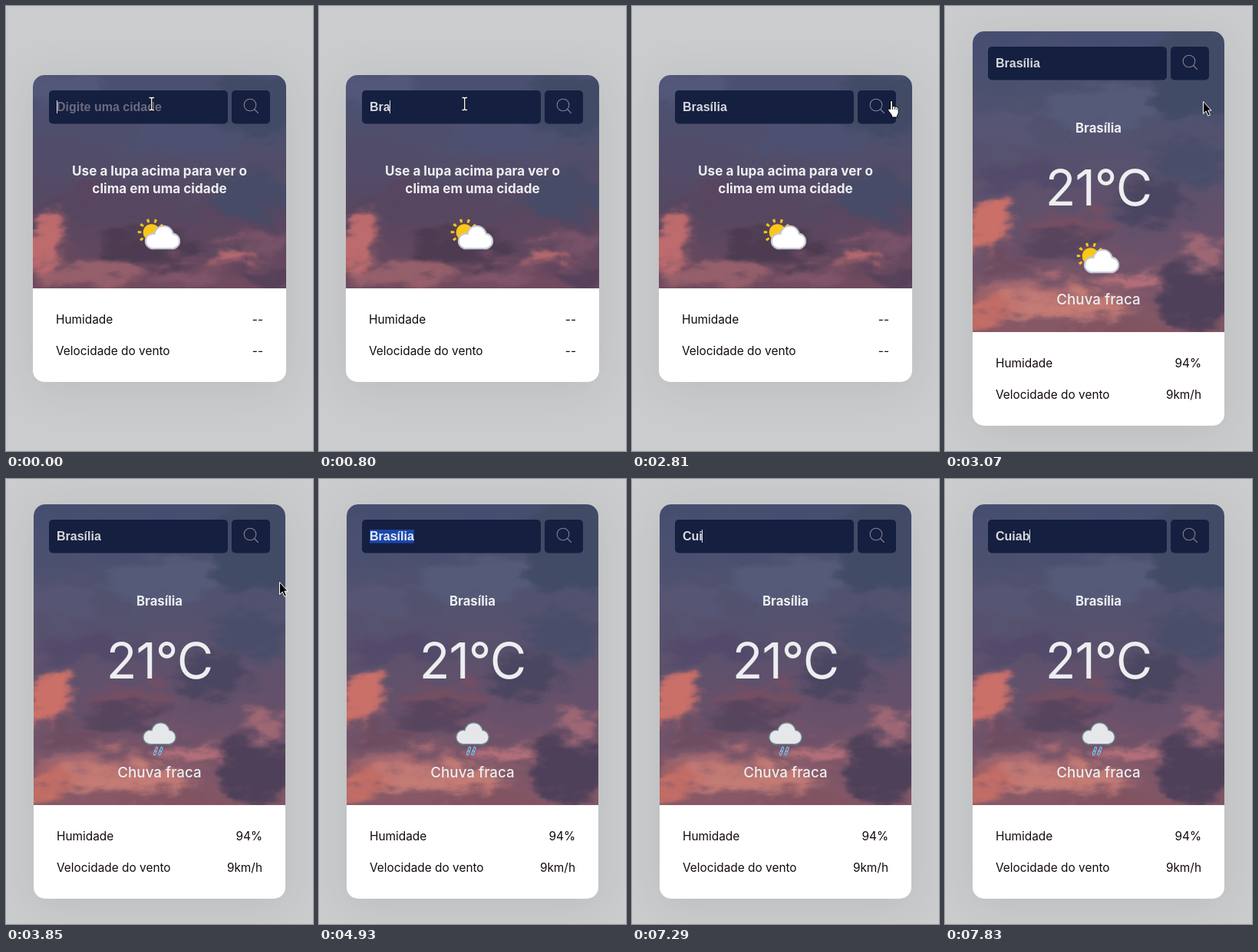
An HTML page that plays this animation: 400x580 px, repeating every 8000 ms.

```html
<!DOCTYPE html>
<html lang="pt-BR">
<head>
<meta charset="utf-8">
<title>Clima</title>
<style>
  html, body { margin: 0; width: 100%; height: 100%; overflow: hidden; background: #cbccce; }
  svg { display: block; width: 400px; height: 580px; }
  text { font-family: Inter, sans-serif; white-space: pre; }
  .label { font-size: 15.4px; fill: #140a12; }
  .title { font-weight: 700; fill: #edeef0; text-anchor: middle; }
  .end { text-anchor: end; }
  .card { fill: #fff; filter: drop-shadow(0 8px 28px #00000014); }
  #typed { font: bold 16px "Liberation Sans", Arial, sans-serif; }
</style>
</head>
<body>
<svg viewBox="0 0 400 580">
  <defs>
    <filter id="clouds" filterUnits="userSpaceOnUse" x="0" y="0" width="400" height="580" color-interpolation-filters="sRGB">
      <feGaussianBlur in="SourceGraphic" stdDeviation="6" result="soft"/>
      <feTurbulence type="fractalNoise" baseFrequency=".022 .042" numOctaves="5" seed="3" result="noise"/>
      <feDisplacementMap in="soft" in2="noise" scale="52" xChannelSelector="R" yChannelSelector="G"/>
    </filter>

    <g id="field" fill="#151f40">
      <rect x="56" y="0" width="233" height="43.5" rx="5"/>
      <rect x="294" y="0" width="50" height="43.5" rx="5"/>
      <g fill="none" stroke="#85808f" stroke-width="1.1" stroke-linecap="round">
        <circle cx="318" cy="19" r="7.8"/>
        <path d="M323.500 24.500L328.500 29.500"/>
      </g>
    </g>

    <g id="cloud">
      <circle cx="11" cy="20" r="8.5"/>
      <circle cx="24.5" cy="13" r="11"/>
      <circle cx="35" cy="20" r="8.5"/>
      <rect x="10" y="15" width="26" height="13.5"/>
    </g>

    <g id="sunny">
      <circle cx="17.5" cy="18" r="10.8" fill="#fbc716"/>
      <circle cx="17.5" cy="18" r="15.5" fill="none" stroke="#fbc716" stroke-width="4.5" stroke-dasharray="3 6.74" stroke-dashoffset="1.5"/>
      <g transform="translate(8.3 8.8) scale(1.03)">
        <use href="#cloud" fill="#c5c8d0" stroke="#c5c8d0" stroke-width="4"/>
        <use href="#cloud" fill="#fff"/>
      </g>
    </g>

    <g id="rainy">
      <use href="#cloud" fill="#6c8791" stroke="#6c8791" stroke-width="3"/>
      <use href="#cloud" fill="#e6e7ea"/>
      <g stroke-linecap="round">
        <path d="M19.500 34l-3 8M26 34l-3 8" stroke="#d5e3ee" stroke-width="3.2"/>
        <path d="M19.500 34l-3 8M26 34l-3 8" stroke="#2883c6" stroke-width="2" stroke-dasharray="3.5 2.4"/>
      </g>
    </g>

    <path id="beamLine" fill="none" d="M1.500 1.500h2.200l1 1 1-1h2.300M4.700 2v15M1.500 17.500h2.200l1-1 1 1h2.300"/>
    <g id="beam">
      <use href="#beamLine" stroke="#111" stroke-width="3"/>
      <use href="#beamLine" stroke="#fff" stroke-width="1.3"/>
    </g>
    <path id="arrow" d="M.5 .5v16l3.700-3.500 2.600 6.200 2.600-1.100-2.600-6h4.200z" fill="#000" stroke="#fff"/>
    <g id="hand" stroke="#000" stroke-linejoin="round">
      <path d="M3.500 11.500V2q0-1.600 1.500-1.600T6.500 2v6q2-1.200 3 .4 2-1 2.700.6 2-.3 2 1.500v5q0 2-1.600 4v2.500H5.500v-2.500L1 13.500q-1-2 .5-2.500z" fill="#fff"/>
      <path d="M6.500 8v4M9.500 9v3M12 10v2.500" fill="none" stroke-width=".8"/>
    </g>
  </defs>

  <rect width="400" height="580" fill="#cbccce"/>
  <g id="before"></g>
  <g id="after"></g>
  <g id="input">
    <rect id="selection" x="66" y="123" height="17.5" fill="#1a48ad"/>
    <text id="typed" x="66" y="137"></text>
    <rect id="caret" y="123" width="1" height="17" fill="#dcdde2"/>
  </g>
  <use id="pointer"/>
</svg>

<script>
const $ = id => document.getElementById(id);
const LOOP = 8000;

// Cloud patches: centre x, centre y, radius x, radius y, colour
const duskSky = {
  stops: ['#4a5070', '#504f6c', '#57465f', '#704a5e'],
  patches: [
    [70, 105, 60, 22, '#535779'], [325, 130, 70, 40, '#414b66'],
    [230, 175, 75, 25, '#4d5070'], [85, 190, 60, 22, '#514c69'],
    [325, 245, 60, 32, '#484b67'], [130, 250, 70, 16, '#58455f'],
    [50, 308, 28, 32, '#bd6b6d'], [105, 350, 70, 16, '#96606b'],
    [185, 315, 65, 20, '#4c3b51'], [235, 352, 50, 9, '#84566a'],
    [293, 326, 30, 13, '#b5696f'], [340, 305, 28, 10, '#7a5369'],
    [345, 352, 40, 13, '#56415a']
  ]
};
const rainSky = {
  stops: ['#454e70', '#52526f', '#65506a', '#875866'],
  patches: [
    [330, 90, 70, 55, '#414b66'], [200, 130, 75, 30, '#555a78'],
    [75, 160, 50, 25, '#565573'], [320, 200, 50, 30, '#494d69'],
    [110, 220, 70, 18, '#53496a'], [270, 258, 45, 32, '#4a4560'],
    [165, 283, 60, 12, '#754e61'], [150, 310, 55, 14, '#57445d'],
    [55, 288, 30, 34, '#cb7069'], [90, 335, 35, 10, '#6d4b5e'],
    [340, 315, 28, 12, '#a16874'], [245, 357, 55, 9, '#ba727a'],
    [110, 368, 70, 10, '#a5686f'], [150, 392, 100, 16, '#c47b74'],
    [55, 398, 30, 18, '#c26d66'], [325, 375, 50, 38, '#4e4059'],
    [230, 420, 80, 7, '#80525f']
  ]
};

const text = (cls, x, y, str, attrs = '') => `<text class="${cls}" x="${x}" y="${y}" ${attrs}>${str}</text>`;

function scene(id, { x, y, bottom, horizon, sky, humidity, wind }, content) {
  const right = 400 - x;
  const card = `x="${x}" y="${y}" width="${right - x}" height="${bottom - y}" rx="15"`;
  const stops = sky.stops.map((c, i) => `<stop offset="${i / 3}" stop-color="${c}"/>`).join('');
  const patches = sky.patches.map(([cx, cy, rx, ry, c]) =>
    `<ellipse cx="${cx}" cy="${cy}" rx="${rx}" ry="${ry}" fill="${c}"/>`).join('');
  $(id).innerHTML = `
    <clipPath id="${id}Card"><rect ${card}/></clipPath>
    <clipPath id="${id}Sky"><rect y="${y}" width="400" height="${horizon - y}"/></clipPath>
    <linearGradient id="${id}Fill" gradientUnits="userSpaceOnUse" x1="0" x2="0" y1="${y}" y2="${horizon}">${stops}</linearGradient>
    <rect class="card" ${card}/>
    <g clip-path="url(#${id}Card)"><g clip-path="url(#${id}Sky)">
      <g filter="url(#clouds)"><rect width="400" height="580" fill="url(#${id}Fill)"/>${patches}</g>
    </g></g>
    <use href="#field" y="${y + 20}"/>
    ${content}
    ${text('label', x + 30, horizon + 46, 'Humidade')}
    ${text('label end', right - 30, horizon + 46, humidity)}
    ${text('label', x + 30, horizon + 87, 'Velocidade do vento')}
    ${text('label end', right - 30, horizon + 87, wind)}`;
}

scene('before', { x: 35, y: 90, bottom: 490, horizon: 368, sky: duskSky, humidity: '--', wind: '--' },
  text('title', 200, 221, 'Use a lupa acima para ver o', 'font-size="17.1"') +
  text('title', 200, 244, 'clima em uma cidade', 'font-size="17.1"') +
  '<use href="#sunny" x="172" y="277"/>');

scene('after', { x: 36, y: 33, bottom: 547, horizon: 425, sky: rainSky, humidity: '94%', wind: '9km/h' },
  text('title', 200, 165, 'Brasília', 'font-size="16.7"') +
  text('title', 200, 259.5, '21°C', 'font-size="65" letter-spacing="-1" style="font-weight:400"') +
  text('title', 200, 389, 'Chuva fraca', 'font-size="18.8" style="font-weight:500"') +
  '<use id="icon"/>');

// Value in force at time t from [start, value] steps
const at = (steps, t) => steps.findLast(([start]) => start <= t)[1];

const typing = [[0, ''], [200, 'B'], [600, 'Br'], [800, 'Bra'], [1000, 'Bras'], [1810, 'Brasí'],
  [2010, 'Brasília'], [6770, 'C'], [7290, 'Cui'], [7570, 'Cuia'], [7830, 'Cuiab']];
const caretShown = [[0, true], [1610, false], [1810, true], [2550, false], [4650, true], [4930, false], [6770, true]];
const pointers = [[0, ['beam', 185, 118]], [2270, ['arrow', 351, 153]], [2550, ['arrow', 356, 131]],
  [2810, ['hand', 333, 123]], [3070, ['arrow', 336, 124]], [3590, ['arrow', 349, 134]],
  [3850, ['arrow', 356, 134]], [4390, ['beam', 188, 61]], [4650, null]];

const show = (id, on) => $(id).setAttribute('visibility', on ? 'visible' : 'hidden');

function set(id, attrs) {
  for (const name in attrs) $(id).setAttribute(name, attrs[name]);
}

function draw(t) {
  const loaded = t >= 3070;
  show('before', !loaded);
  show('after', loaded);
  set('icon', t < 3330 ? { href: '#sunny', x: 172, y: 308 } : { href: '#rainy', x: 177, y: 316.5 });

  const value = at(typing, t);
  const selected = t >= 4930 && t < 6770;
  $('typed').textContent = value || 'Digite uma cidade';
  set('typed', { fill: !value ? '#6d6a7c' : selected ? '#e9ebf2' : '#d8d9dd' });
  const width = value ? $('typed').getComputedTextLength() : 0;
  set('input', { transform: `translate(0 ${loaded ? -57 : 0})` });
  set('selection', { width });
  show('selection', selected);
  set('caret', { x: Math.floor(66 + width) });
  show('caret', at(caretShown, t));

  const pointer = at(pointers, t);
  show('pointer', pointer);
  if (pointer) set('pointer', { href: '#' + pointer[0], x: pointer[1], y: pointer[2] });
}

const start = performance.now();
function tick() {
  draw((performance.now() - start) % LOOP);
  requestAnimationFrame(tick);
}
tick();
</script>
</body>
</html>
```
